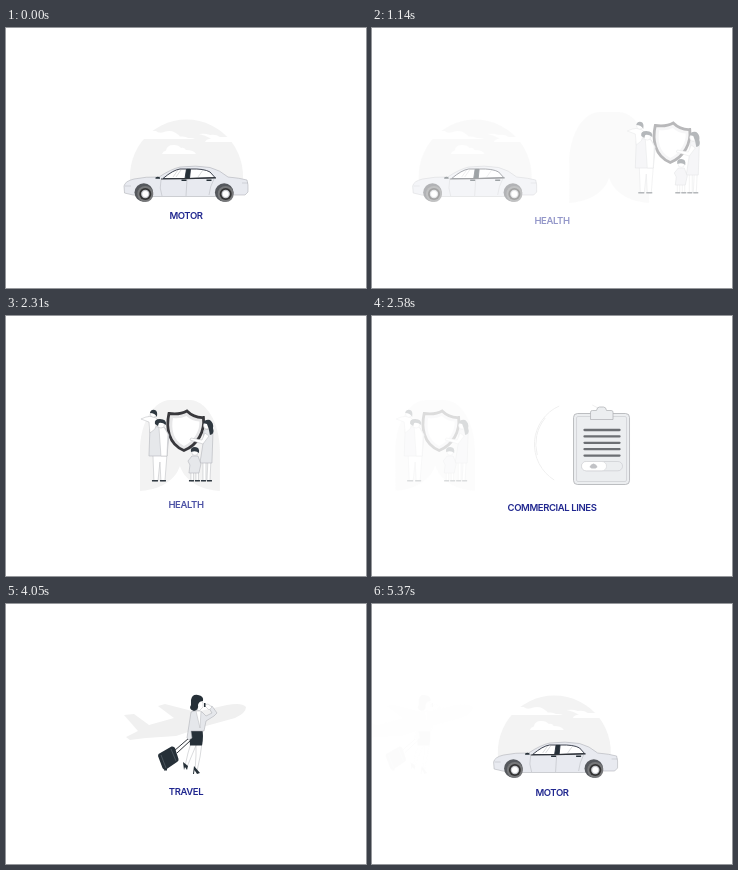
Animation of 360 by 260 pixels, one loop 5.4 s. Source, as an HTML page:

```html
<!DOCTYPE html>
<html lang="en">
<head>
<meta charset="utf-8">
<title>Insurance lines</title>
<style>
  html, body { margin: 0; width: 100%; height: 100%; overflow: hidden; background: #fff; }
  svg { display: block; width: 360px; height: 260px; }
  text { font: 600 9.5px Inter, sans-serif; letter-spacing: -.4px; fill: #20278f; text-anchor: middle; }
  .bg { fill: #f3f3f3; }
  .dark { fill: #263038; }
  .pale { fill: #e5e7eb; stroke: #a4a7ad; stroke-width: .5; }
  .white { fill: #fff; stroke: #b5b7bb; stroke-width: .5; }
  .line { fill: none; stroke: #30343a; }
  .seam { fill: none; stroke: #a4a7ad; stroke-width: .4; }
</style>
</head>
<body>
<svg viewBox="0 0 360 260">
  <defs>
    <g id="wheel">
      <circle cx="-1.500" cy="-1.500" r="9.300" fill="#55585d"/>
      <circle r="8" fill="#77787a"/>
      <circle r="6" fill="#333"/>
      <circle r="4.200" fill="#c9cbd0"/>
      <circle r="3" fill="#fff"/>
    </g>
  </defs>

  <g class="scene">
    <g class="bg">
      <path d="M126 163A56.500 56.500 0 1 1 235 163Z"/>
      <path fill="#fff" d="M126 111V103H150Q153 106 158 104Q164 102 169 104.500Q173 107 174 108.500Q180 108 182 110Q187 109.500 189 111Z
        M193 106Q199 105 204 107Q210 106 214 109H236V114H199Q200 111 205 110.500Q199 107 193 106Z
        M156 126Q157 123 160 122.500Q161 117 167 117Q172 116.500 175 120Q178 119 180 122Q188 122 190 126Z"/>
    </g>
    <g class="fg">
      <path class="pale" style="fill:#e8eaf0" d="M118 158Q119 153 128 151Q140 148.500 153 149Q165 141 174 139Q190 137 204 139.500Q214 142 222 149Q234 150 241 152Q242.500 156 242 164L239 167H225L208 168.500H144L127 167L118.500 165Z"/>
      <path fill="#fff" stroke="#2d3340" stroke-width=".9" d="M157 150.500Q167 142 174 141H180.500L179 150.500ZM184.500 141Q198 140.500 204 144L209 149.500L183.500 150.500Z"/>
      <path class="dark" d="M180.500 140.500H184.500L183.500 151H179Z"/>
      <path class="line" stroke-width="1.200" d="M155 151L180 150.700L210 149.800"/>
      <path class="seam" d="M155 152Q153 160 156 168M181 151L180 168M208 151Q204 158 203 167M167 149L172 142M170 149L175 142M192 149L197 142M119 158H125M236 155H242"/>
      <path class="dark" d="M175.500 151.500h5v1.500h-5zM200.500 151.500h5v1.500h-5zM149.500 149.500q2.500-1.500 4.500 0v1.200h-4.500z"/>
      <use href="#wheel" x="139.300" y="166"/>
      <use href="#wheel" x="219.700" y="166"/>
    </g>
  </g>

  <g class="scene">
    <path class="bg" d="M140 175V135C140 105 155 84 170 84H190C205 84 220 105 220 135V175C205 174 186 168 180 150C174 168 155 174 140 175Z"/>
    <g class="fg">
      <path fill="#e6e6e8" stroke="#303034" stroke-width="2.800" d="M187 95Q180 99 169 97.500C166 111 168 128 184 134.500C198 129 205 115 203.500 101.500Q194 102 187 95Z"/>
      <path fill="#fff" d="M186.500 100Q180 103 173 102C171 113 173 124 184 130C194 125 200 115 199.500 105.500Q192 105 186.500 100Z"/>

      <path class="white" d="M153 139H167L165 165H161L160 146L158 165H154Z"/>
      <path class="pale" d="M150 113Q155 109 165 112L169 119L167 140H149Z"/>
      <path class="white" d="M159 111L161 140H167L168 118L164 111ZM146 101Q154 99 158 104L155 113L150 117L149 106L141 103Z"/>
      <circle class="white" cx="161" cy="108.500" r="3.600"/>
      <circle class="white" cx="153.500" cy="98" r="3.200"/>
      <path class="dark" d="M155 108Q154 103 160 103Q167 103 166 109Q162 106 159 107L158 110ZM150 97Q151 93 155 94Q158 95 157 101Q155 97 150 97ZM152 164h6v1.500h-6zM160 164h6v1.500h-6z"/>

      <path class="white" d="M203 144H206V165H203ZM208 144H211L210 165H207Z"/>
      <path class="pale" d="M204 114Q210 112 213 117L212 147H200L203 128Z"/>
      <path class="white" d="M205 117L202 124L191 122L190 124L203 128L209 120Z"/>
      <circle class="white" cx="207" cy="109.500" r="3.500"/>
      <path class="dark" d="M203 107Q205 103 210 104Q214 107 213 112Q215 118 210 119Q209 112 207 108ZM201 164h5v1.500h-5zM207 164h5v1.500h-5z"/>

      <path class="white" d="M191 154H193.500V165H191ZM196 154H198.500V165H196Z"/>
      <path class="pale" d="M192 140H198L201 148L199 157H189L190 149L188 145Z"/>
      <circle class="white" cx="195" cy="136" r="3.300"/>
      <path class="dark" d="M191 136Q190 131 195 131Q200 131 199 137Q196 134 191 136ZM189 164h5v1.500h-5zM195 164h5v1.500h-5z"/>
    </g>
  </g>

  <g class="scene">
    <path class="bg" style="fill:none" stroke="#e9e9e9" d="M162 90A42 42 0 0 0 157 164M148 102A41 41 0 0 0 140 139M195 89A42 42 0 0 1 220 136M216 147A42 42 0 0 1 199 165M207 104A37 37 0 0 1 214 130"/>
    <g class="fg">
      <rect class="pale" x="151" y="97.500" width="56" height="71" rx="4" style="stroke:#8c8e93;stroke-width:.8"/>
      <rect class="pale" x="154" y="100.500" width="50" height="65" rx="1.500"/>
      <path class="pale" style="stroke:#8c8e93;stroke-width:.7" d="M168 103.500V96Q168 94.500 170 94.500H174Q174.500 91 177 91H181Q183.500 91 184 94.500H188.500Q190.500 94.500 190.500 96V103.500Z"/>
      <path class="line" stroke-width="2.300" stroke-linecap="round" d="M162 114h35m-35 6.400h35m-35 6.400h35m-35 6.400h35m-35 6.400h35"/>
      <rect class="pale" x="159" y="145.500" width="41" height="9.300" rx="4.600"/>
      <rect class="white" x="159" y="145.500" width="25" height="9.300" rx="4.600"/>
      <path fill="#a8aaaf" d="M167 151Q168 148 171 147.500Q174 148 175 151L173 152.500H169Z"/>
    </g>
  </g>

  <g class="scene">
    <path class="bg" style="fill:#f0f0f0" d="M118 111L128 110L143 121L168 114L152 102L159 100L190 108L221 101Q236 98 240 103Q240 109 229 114L200 122L170 132L140 134L124 136L120 133L132 127Z"/>
    <g class="fg">
      <path class="line" stroke-width="1" d="M168 147L183 134M171 149L185 136"/>
      <path class="dark" d="M152.500 150L165.500 142.500Q168 142 169 144L172.500 155Q173 157 171 158L160 165.500Q157.500 166 156.500 164L152 152ZM158 165l3-1v2.500h-3z"/>
      <path class="line" style="stroke:#6d777e" stroke-width=".5" d="M155 151L160 164M165 145L170 157"/>
      <path class="white" d="M185 139H191L186 151L181 163L179 162L182 149ZM190 139H196L194 153L191 167H189L190 151Z"/>
      <path class="dark" d="M185 124H196Q198 132 196 141.500H184Q183 132 185 124ZM177 158L182 162L181 166L179 163L178 166ZM188 162L194 169L191 170L188.500 166L188 170H187Z"/>
      <path class="pale" d="M185 108Q190 105 196 108L200 112L206 109L203 104L206 102L211 109L208 112L200 117L198 127H185L186 134L183 136L181 134L183 121Z"/>
      <path class="white" d="M190 107H195L194 124ZM192 97Q198 95 197 103L193 107L190 104ZM198 101L202 100L206 103L203 106Z"/>
      <path class="dark" d="M185 96Q186 90 192 91Q198 92 197 97Q193 97 192 101Q193 106 188 107Q182 105 185 101ZM198 99h1.500v4h-1.500z"/>
    </g>
  </g>

  <text x="180" y="191.200">MOTOR</text>
  <text x="180" y="191.200">HEALTH</text>
  <text x="180" y="191.200">COMMERCIAL LINES</text>
  <text x="180" y="191.200">TRAVEL</text>
</svg>
<script>
  const STEP = 30, SLOT = 1350, HOLD = 900, TRAVEL = 140, DROP = 5.2;
  const scenes = [...document.querySelectorAll('.scene')];
  const labels = [...document.querySelectorAll('text')];

  const clamp = v => Math.min(1, Math.max(0, v));
  const ease = p => (1 - Math.cos(Math.PI * clamp(p))) / 2;

  function place(i, backX, frontX, alpha, textY, textAlpha) {
    const [back, front] = scenes[i].children;
    back.setAttribute('transform', `translate(${backX} 0)`);
    front.setAttribute('transform', `translate(${frontX} 0)`);
    scenes[i].setAttribute('opacity', alpha);
    labels[i].setAttribute('transform', `translate(0 ${textY})`);
    labels[i].setAttribute('opacity', textAlpha);
  }

  function draw(ms) {
    const t = Math.floor(ms / STEP) * STEP % (SLOT * 4);
    const current = Math.floor(t / SLOT), next = (current + 1) % 4;
    const p = clamp((t % SLOT - HOLD) / (SLOT - HOLD));
    const leave = ease(p);
    const enter = clamp((p - .35) / .65);
    const rest = TRAVEL * (1 - ease(enter));

    scenes.forEach((_, i) => place(i, 0, 0, 0, 0, 0));
    place(current, -TRAVEL * leave, -TRAVEL * leave, 1 - leave,
      DROP * ease(p / .4), clamp(1.15 - p * 2.6));
    // The backdrop travels half as far as the figure in front of it.
    place(next, rest / 2, rest, clamp(enter * 1.2),
      DROP * (1 - ease((p - .6) / .4)), clamp(enter * 1.7));
  }

  const start = performance.now();
  function tick() {
    draw(performance.now() - start);
    requestAnimationFrame(tick);
  }
  tick();
</script>
</body>
</html>
```
